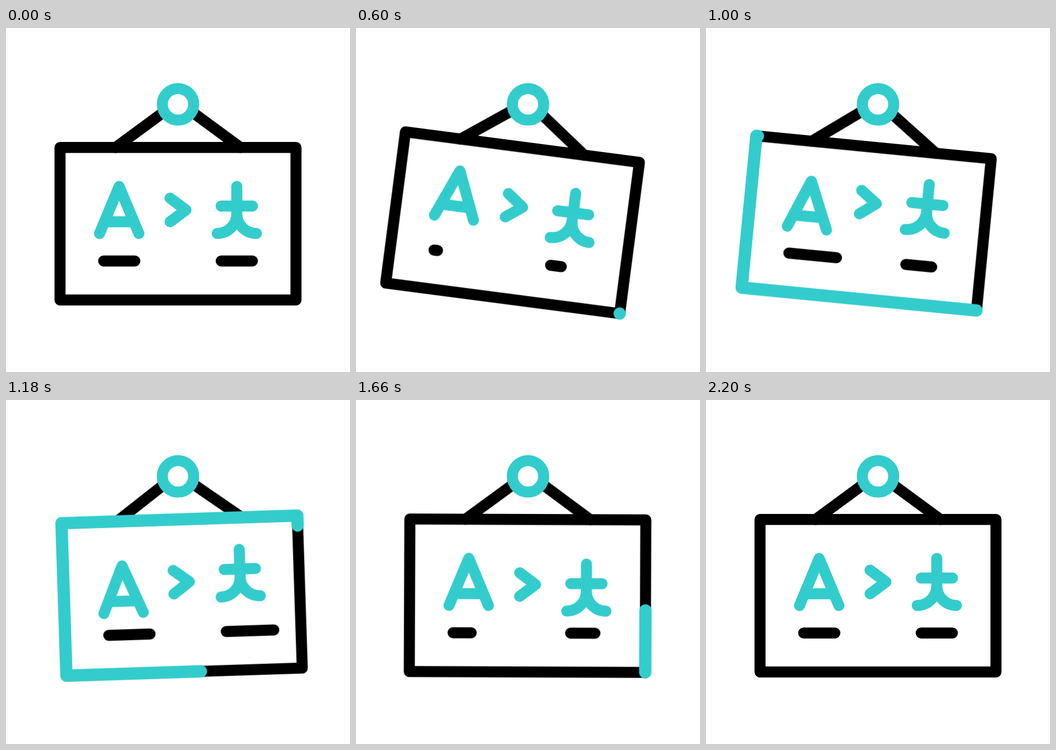
An HTML page without scripts for the animation above (2400 ms loop, 640x640 px).

```html
<!DOCTYPE html>
<html lang="en">
<head>
<meta charset="utf-8">
<title>Translation sign</title>
<style>
  @property --head { syntax: "<number>"; inherits: false; initial-value: 0; }
  @property --tail { syntax: "<number>"; inherits: false; initial-value: 0; }

  html, body { margin: 0; height: 100%; overflow: hidden; background: #fff; }
  svg { display: block; width: 100%; height: 100%; }

  .line {
    fill: none;
    stroke: #000;
    stroke-width: 20.5;
    stroke-linecap: round;
    stroke-linejoin: round;
  }
  .teal { stroke: #3cc; }

  /* Everything rests for 200 ms, then moves for 2 s of each loop. */
  .sign, .glyph, .dash, .runner {
    animation: 2.4s cubic-bezier(.3333, 0, .6667, 1) .2s infinite;
  }

  .sign { transform-origin: 320px 142px; animation-name: swing; }
  @keyframes swing {
    0%, 83.333%, 100% { transform: rotate(0deg); }
    25% { transform: rotate(10deg); }
    50% { transform: rotate(-7deg); }
    66.667% { transform: rotate(3deg); }
  }

  .glyph { animation-name: bob; }
  .second { animation-delay: .4s; }
  .third { animation-delay: .6s; }
  @keyframes bob {
    0%, 62.5%, 100% { transform: translateY(0); }
    20.833% { transform: translateY(-15px); }
    41.667% { transform: translateY(10.5px); }
  }

  .dash { stroke-dasharray: 58px 200px; }
  .left { animation-name: left; }
  .right { animation-name: right; }
  @keyframes left {
    0%, 83.333%, 100% { stroke-dasharray: 58px 200px; }
    16.667% { stroke-dasharray: 6.5px 200px; }
    33.333% { stroke-dasharray: 89px 200px; }
    58.333% { stroke-dasharray: 33px 200px; }
  }
  @keyframes right {
    0%, 83.333%, 100% { stroke-dasharray: 58px 200px; }
    25% { stroke-dasharray: 7px 200px; }
    41.667% { stroke-dasharray: 89px 200px; }
    69.167% { stroke-dasharray: 33px 200px; }
  }

  /* A highlight that runs once round the border. */
  .runner {
    opacity: 0;
    stroke-width: 22.8;
    stroke-dasharray: calc((var(--head) - var(--tail)) * 1px) 3000px;
    stroke-dashoffset: calc(var(--tail) * -1px);
    animation-name: head, tail, show;
  }
  @keyframes head {
    0%, 16.667% { --head: 0; }
    50%, 100% { --head: 1446; }
  }
  @keyframes tail {
    0%, 33.333% { --tail: 0; }
    66.667%, 100% { --tail: 1446; }
  }
  @keyframes show {
    0%, 66.667%, 100% { opacity: 0; animation-timing-function: step-end; }
    16.667% { opacity: 1; animation-timing-function: step-end; }
  }
</style>
</head>
<body>
<svg viewBox="0 0 640 640">
  <g class="sign">
    <path class="line" d="M204 222.3L290 159M436 222.3L350 159"/>
    <path class="line" d="M539.5 506H100.5V222.2H539.5Z"/>
    <path class="line teal runner" d="M539.5 506H100.5V222.2H539.5V506"/>

    <g class="glyph">
      <path class="line teal" d="M174 382.4L210.5 294.8L247.2 382.4"/>
      <path class="line teal" stroke-linecap="butt" style="stroke-linecap:butt" d="M184 360.6H237"/>
    </g>
    <path class="line teal glyph second" d="M305.2 316.6L334.8 338.5L305.2 360.4"/>
    <path class="line teal glyph third" d="M429.4 294.8V345.8A36.5 36.5 0 0 1 392.9 382.3M429.4 345.8A36.5 36.5 0 0 0 465.9 382.3M400.2 331.3H458.6"/>

    <path class="line dash left" d="M181.7 433.4H300"/>
    <path class="line dash right" d="M400.4 433.4H520"/>
  </g>
  <circle class="line teal" cx="320" cy="142" r="29.2"/>
</svg>
</body>
</html>
```
